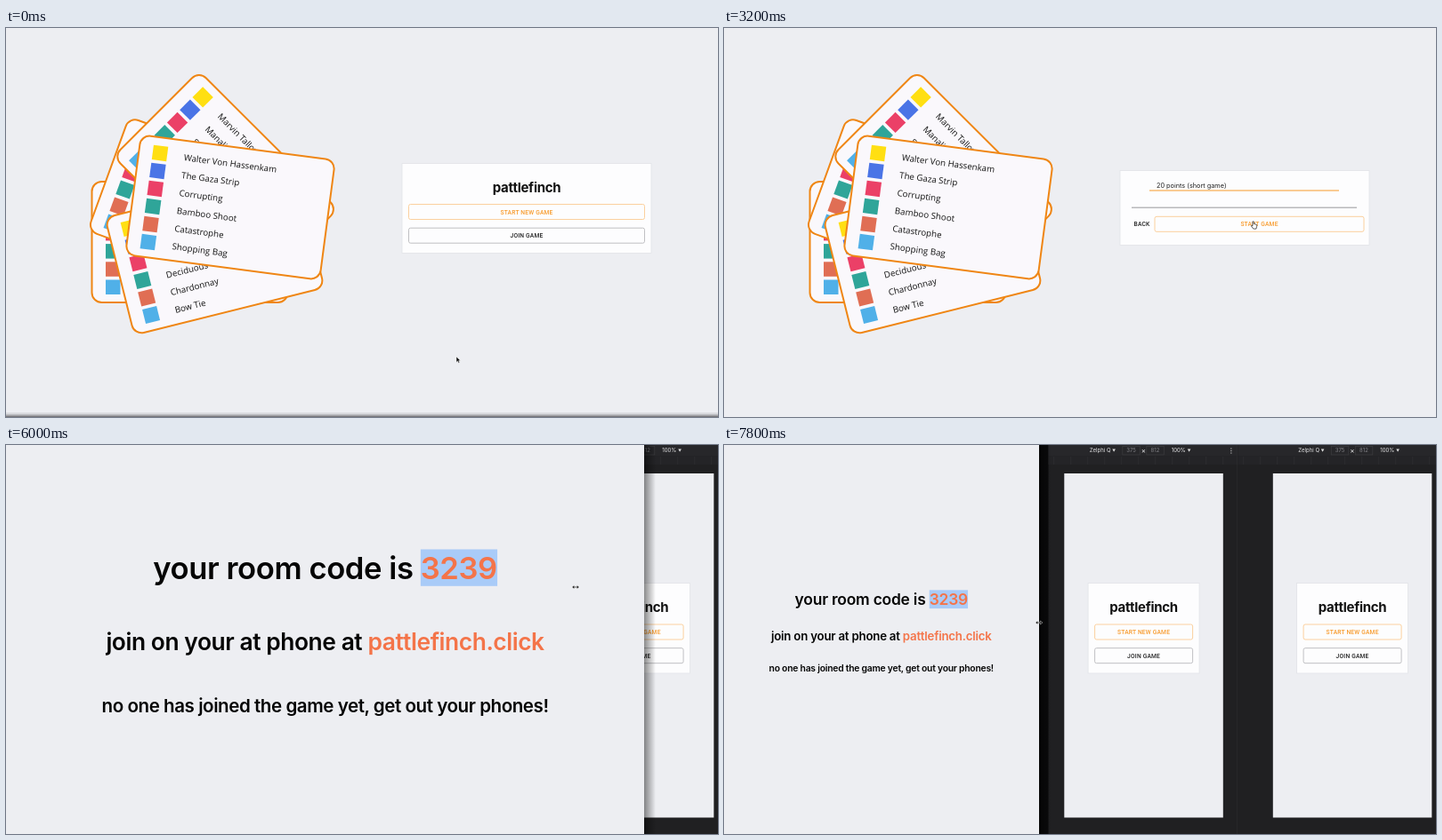
These frames come from a looping animation (800x438 px, 8 s). An HTML page:

```html
<!DOCTYPE html>
<html lang="en">
<head>
<meta charset="utf-8">
<title>Party game demo</title>
<style>
  html, body { margin: 0; width: 100%; height: 100%; overflow: hidden; background: #edeef2; }
  #stage { position: relative; width: 800px; height: 438px; overflow: hidden; background: #0a0a0b; }
  svg { position: absolute; left: 0; top: 0; }
  #page { position: absolute; left: 0; top: 0; height: 438px; overflow: hidden; background: #edeef2; }
  #shade { position: absolute; top: 0; width: 13px; height: 438px;
    background: linear-gradient(90deg, rgba(0,0,0,.45), transparent); }
  #room { position: absolute; top: 0; width: 800px; height: 438px; transform-origin: 400px 209.7px;
    font: 600 20px Inter, sans-serif; letter-spacing: -.025em; color: #050505; }
  #room p { position: absolute; margin: 0; width: 799px; height: 60px; line-height: 60px;
    text-align: center; white-space: pre; }
  #room span { color: #f47449; }
  #room .selected { background: #a9cbf8; }
  .ui { font-family: Inter, sans-serif; }
  .title { font: 700 15px Inter, sans-serif; letter-spacing: -.02em; fill: #111; }
  .button { font: 500 6.7px Roboto, sans-serif; letter-spacing: .028em; }
  .card { font: 9.75px "Open Sans", sans-serif; fill: #111; }
</style>
</head>
<body>
<div id="stage">
  <svg id="devtools" class="ui" width="800" height="438"></svg>
  <div id="shade"></div>
  <div id="page">
    <svg id="lobby" class="ui" width="800" height="438"></svg>
    <div id="room">
      <p style="top:99.5px;font-size:38.6px">your room code is <span id="code">3239</span></p>
      <p style="top:192.8px;font-size:29.4px">join on your at phone at <span>pattlefinch.click</span></p>
      <p style="top:272.7px;font-size:22.9px">no one has joined the game yet, get out your phones!</p>
    </div>
  </div>
  <svg width="800" height="438"><g id="cursor" stroke-linejoin="round"></g></svg>
</div>
<script>
const LOOP = 8000, STEP = 200;
const OPEN_FORM = 1200, OPEN_MENU = 1800, PICK = 2600, ENTER_ROOM = 3800, SELECT_CODE = 4800;
const ORANGE = '#ef8614';
const $ = id => document.getElementById(id);

const rect = (x, y, w, h, fill, extra = '') =>
  `<rect x="${x}" y="${y}" width="${w}" height="${h}" fill="${fill}" ${extra}/>`;
const text = (x, y, content, extra = '') => `<text x="${x}" y="${y}" ${extra}>${content}</text>`;
const centred = (x, y, content, cls, fill) =>
  text(x, y, content, `class="${cls}" fill="${fill}" text-anchor="middle"`);

function button(cx, y, w, label, color, border, fill = 'none') {
  return rect(cx - w / 2, y, w, 17, fill, `rx="2" stroke="${border}" stroke-width=".9"`) +
    centred(cx, y + 11, label, 'button', color);
}

// Home panel, shared by the desktop page and both phones
function home(cx, top, w, h, titleY, firstY, hover) {
  return rect(cx - w / 2, top, w, h, '#fdfdfe', 'stroke="#e2e3e8" stroke-width=".8"') +
    centred(cx, titleY, 'pattlefinch', 'title', '#111') +
    button(cx, firstY, w - 15, 'START NEW GAME', '#f79a2b',
      hover ? '#f6a541' : '#fbcb94', hover ? '#fff8ef' : 'none') +
    button(cx, firstY + 26.7, w - 15, 'JOIN GAME', '#222', '#b9b9bd');
}

const SWATCHES = ['#ffdf12', '#4a74e6', '#eb4067', '#2fa599', '#e06e54', '#50b0e8'];
const CARDS = [
  [206.5, 241, 0, []],
  [218.5, 201.8, 20, []],
  [246.6, 174.4, 45, ['Marvin Tallow', 'Manalive', 'Sunday']],
  [234.5, 253, -14, ['', '', '', 'Deciduous', 'Chardonnay', 'Bow Tie']],
  [252, 202, 7.5, ['Walter Von Hassenkam', 'The Gaza Strip', 'Corrupting',
    'Bamboo Shoot', 'Catastrophe', 'Shopping Bag']]
];

function card([cx, cy, angle, words]) {
  const rows = SWATCHES.map((color, i) => {
    const y = -50.3 + i * 20.2;
    return rect(-94.5, y - 8.2, 16.5, 16.5, color) + text(-59, y + 4.6, words[i] || '');
  }).join('');
  return `<g class="card" transform="translate(${cx} ${cy}) rotate(${angle})">` +
    rect(-110, -68, 220, 136, '#faf8fc', `rx="11" stroke="${ORANGE}" stroke-width="2"`) + rows + '</g>';
}
const cards = CARDS.map(card).join('');

function setupForm(t) {
  const picked = t >= PICK, open = t >= OPEN_MENU && !picked;
  let out = rect(445, 160.5, 280, 84, '#fdfdfe', 'stroke="#e2e3e8" stroke-width=".8"') +
    text(486, 179.5, picked ? '20 points (short game)' : 'points to win', 'font-size="7.3" fill="#222"') +
    rect(478, 182.5, 213, 1, t >= OPEN_MENU ? '#f79a2b' : '#999') +
    rect(458, 201.7, 253, .9, '#8b8b8f') +
    text(460.5, 223.3, 'BACK', 'class="button" fill="#222"') +
    button(601.5, 212.3, 235, 'START GAME', picked ? '#f79a2b' : '#bbb', picked ? '#fbcb94' : '#e2e2e6');
  if (open) {
    const labels = ['points to win', '20 points (short game)', '40 points (standard game)', '80 points (long game)'];
    out += rect(474.5, 168, 213, 54.5, '#4c4c4d', 'rx="3" stroke="#3d3d3e" stroke-width=".7"') +
      rect(475, 183.2, 212, 12.6, '#3c8df0') +
      '<path d="M479.5 177l1.6 2 2.8-4.4" fill="none" stroke="#fff"/>' +
      labels.map((label, i) => text(486, 179.6 + i * 12.3, label, 'font-size="7.3" fill="#f4f4f4"')).join('');
  }
  return out;
}

function lobby(t) {
  const bottom = t < STEP
    ? rect(0, 433, 800, 2, '#d9dade') + rect(0, 435, 800, 1.5, '#b4b4b8') + rect(0, 436.5, 800, 1.5, '#77777b') : '';
  const panel = t >= OPEN_FORM ? setupForm(t) : home(585, 152.5, 280, 101, 184.6, 198.5, t >= 1000);
  return cards + panel + bottom;
}

function phoneWindow(left, width, phoneX) {
  const at = phoneX + 28.5;
  const field = (x, value) => rect(x, 1.5, 19.5, 9.5, 'none', 'stroke="#3d3d40" stroke-width=".7"') +
    text(x + 9.7, 8.2, value, 'fill="#85858a" text-anchor="middle"');
  const arrow = x => `<path d="M${x} 4.6h3.6l-1.8 3.2z" fill="#ddd"/>`;
  let ticks = '';
  for (let x = left + 6; x < left + width; x += 19) ticks += rect(x, 13, .6, 9, '#303034');
  return `<g font-size="6" fill="#e4e4e6">` +
    rect(left, 0, width, 438, '#202022') + rect(left, 0, width, 12.5, '#27272a') +
    rect(left, 12.5, width, 9.5, '#242427') + ticks +
    text(at, 8.2, 'Zelphi Q') + arrow(at + 25.5) +
    field(at + 37, '375') + text(at + 60.5, 8.8, '×', 'text-anchor="middle" font-size="8"') + field(at + 64, '812') +
    text(at + 92, 8.2, '100%') + arrow(at + 110) +
    [3.5, 6, 8.5].map(y => rect(phoneX + 187, y, 1.1, 1.1, '#ccc')).join('') +
    rect(phoneX, 32, 178.5, 387.5, '#edeef2') +
    home(phoneX + 89.3, 155.5, 125, 101.5, 188.3, 202, false) + '</g>';
}
$('devtools').innerHTML = phoneWindow(364.5, 212, 382.3) + rect(576.5, 0, 1, 438, '#39393c') +
  phoneWindow(577.5, 222.5, 616.8);

// Keyframes: time followed by the values to interpolate
const CURSOR = [
  [0, 506, 370], [200, 506, 370], [800, 595, 212], [1200, 598, 207], [1800, 575, 178], [2200, 576, 188],
  [2600, 576, 189], [3200, 594, 218], [3800, 595, 219], [4000, 595, 219], [4600, 562, 131], [4800, 562, 131],
  [5400, 798, 134], [5600, 798, 150], [5800, 717, 155], [6000, 640, 160], [6400, 484, 168],
  [6800, 345, 180], [7000, 321, 186], [7200, 325, 192], [7600, 354, 200], [8000, 354, 200]
];
const PAGE_WIDTH = [
  [0, 800], [5800, 800], [6000, 717], [6400, 549], [6600, 482], [6800, 402],
  [7000, 345], [7200, 321], [7400, 326], [7800, 354], [8000, 354]
];
function sample(keys, t) {
  const i = keys.findIndex(key => key[0] > t);
  const [a, b] = [keys[i - 1], keys[i]];
  const k = (t - a[0]) / (b[0] - a[0]);
  return a.slice(1).map((v, n) => v + (b[n + 1] - v) * k);
}

const SHAPES = {
  arrow: '<path d="M0 0v6.4l1.5-1.3 1 2.2 1.2-.5-1-2.2h2z" fill="#111" stroke="#fff" stroke-width=".5"/>',
  hand: '<path d="M0 0q1-.8 1.4.3v2.2l2.9.8q.8.5.3 2l-.6 2.8H.8L-1.7 4.8q.3-1 1.7 0z" fill="#fff" stroke="#222" stroke-width=".7"/>',
  beam: '<path d="M-1.2-4h2.4M0-4v8M-1.2 4h2.4" fill="none" stroke="#333" stroke-width=".8"/>',
  resize: '<path d="M-4 0l2.5-2v1.4h3V-2L4 0 1.5 2V.6h-3V2z" fill="#111" stroke="#fff" stroke-width=".4"/>'
};
function cursorShape(t) {
  if (t >= 5400) return 'resize';
  if (t >= 4200) return 'beam';
  return t >= 1000 && t < 1400 || t >= 2000 && t < 2600 || t >= 3200 ? 'hand' : 'arrow';
}

function draw(t) {
  const inRoom = t >= ENTER_ROOM;
  const [width] = sample(PAGE_WIDTH, t);
  $('page').style.width = width + 'px';
  $('shade').style.left = width + 'px';
  $('lobby').style.display = inRoom ? 'none' : '';
  $('room').style.display = inRoom ? '' : 'none';
  if (!inRoom) $('lobby').innerHTML = lobby(t);
  $('room').style.left = width / 2 - 400 + 'px';
  $('room').style.transform = `scale(${1 - (800 - width) * .00123})`;
  $('code').className = t >= SELECT_CODE ? 'selected' : '';
  const cursor = $('cursor');
  cursor.innerHTML = SHAPES[cursorShape(t)];
  cursor.setAttribute('transform', `translate(${sample(CURSOR, t).join(' ')})`);
  cursor.setAttribute('opacity', inRoom && t < 4200 ? .35 : 1);
}

const start = performance.now();
let shown = -1;
function frame() {
  const t = Math.floor((performance.now() - start) % LOOP / STEP) * STEP;
  if (t !== shown) draw(shown = t);
  requestAnimationFrame(frame);
}
frame();
</script>
</body>
</html>
```
